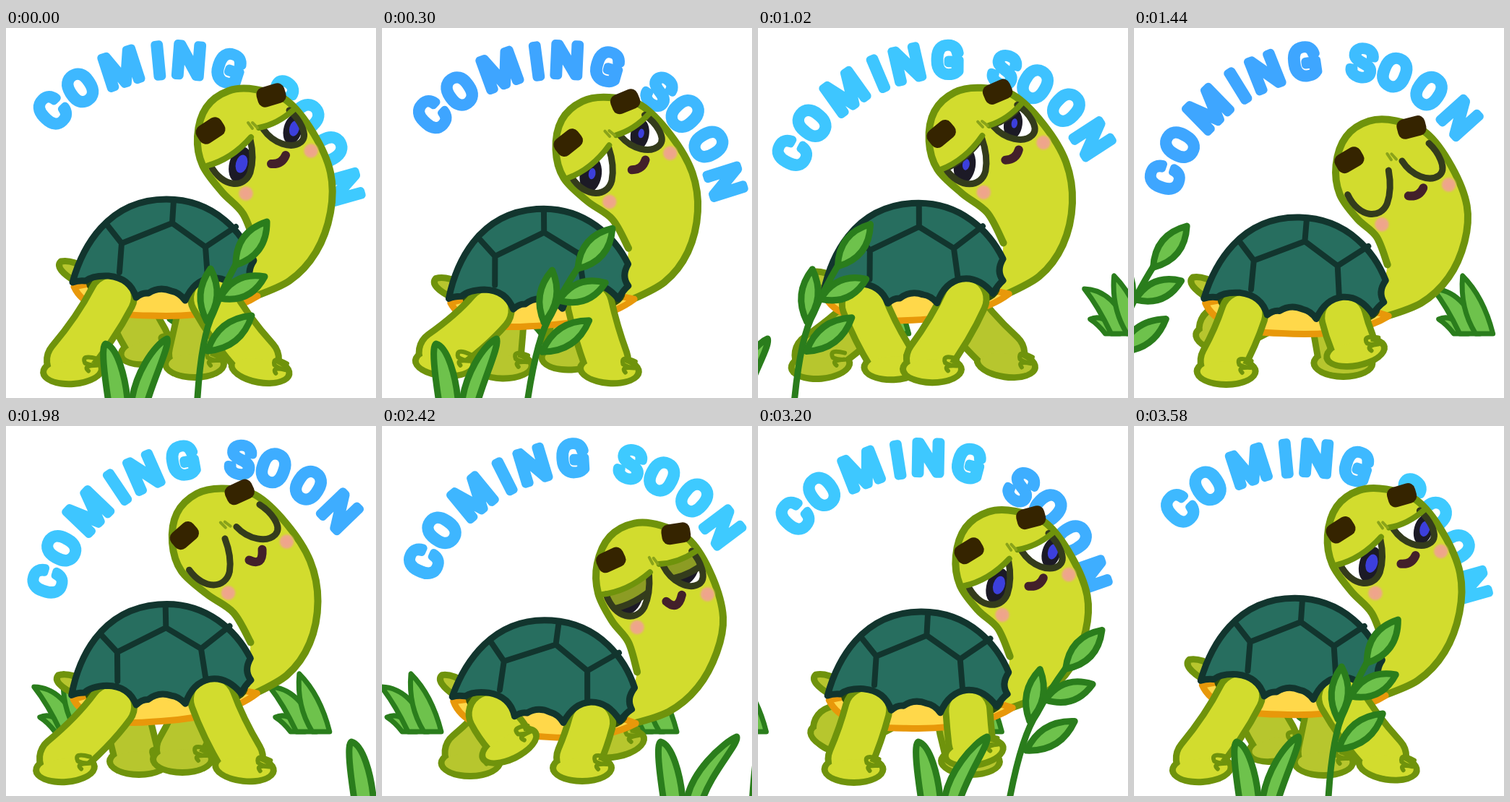
An HTML page with a canvas for the animation above (3600 ms loop, 512 by 512 pixels).

```html
<!DOCTYPE html>
<html lang="en">
<head>
<meta charset="utf-8">
<title>Coming soon</title>
<style>
  html, body { margin: 0; height: 100%; overflow: hidden; background: #fff; }
  canvas { display: block; width: 512px; height: 512px; }
</style>
</head>
<body>
<canvas id="stage" width="512" height="512" aria-label="COMING SOON"></canvas>
<script>
const ctx = document.getElementById('stage').getContext('2d');
const LOOP = 3600, STEP = 900, STRIDE = 1800, DEG = Math.PI / 180;
const SKIN = '#d2dc2e', SKIN_FAR = '#b7c62e', EDGE = '#6f930c';
const SHELL = '#276e5f', SHELL_EDGE = '#12352e', LID = '#343c1c';
const LEAF = '#6ec24c', LEAF_EDGE = '#2a7d1c';
const BODY = [217, 337], HEAD = [377, 200];

// Keys: [time, ...values]
const bodyKeys = [[0, 0, 0, 0], [180, -3, 10, -4.8], [500, 4, 20, -.5], [610, 6, 32, 4]];
const headKeys = [[0, 0, 0, 0], [180, -29, -4, -8], [500, 7, 34, 2], [545, 13, 46, 2.8], [610, 25, 57.5, 8.2]];
const backFoot = [[0, 92, 474, -4], [180, 82, 474, -4], [520, 112, 440, 15], [610, 174, 442, -25],
  [900, 195, 455, -10], [1080, 180, 473, 0], [1420, 130, 475, 0]];
const frontFoot = [[0, 352, 472, 10], [180, 330, 473, 6], [600, 279, 473, 0], [900, 257, 474, 0],
  [1080, 240, 470, 0], [1420, 303, 450, -10], [1500, 316, 447, -12]];
const openKeys = [[0, 1], [1000, 1], [1250, 0], [2200, 0], [2420, .45], [2800, 1]];
const gazeKeys = [[0, 1], [350, -1], [600, -1], [2420, .3], [3200, 1]];
const smileKeys = [[0, 0], [1500, 0], [1900, 1], [2500, 1], [2900, 0]];
const bladeKeys = [[0, 0], [600, 0], [2420, 20], [3200, 10]];

// Outline of neck and head: x, y, share of the head's motion
const neck = [[345, 300, 0], [328, 257, .3], [299, 227, .7], [272, 190, 1], [265, 150, 1], [277, 110, 1],
  [308, 87, 1], [345, 85, 1], [388, 100, 1], [425, 145, 1], [449, 200, .9], [449, 255, .6],
  [429, 310, .35], [392, 350, .15], [335, 375, 0]];
const eyes = [
  { lid: 'M277 191Q312 182 339 151', arc: 'M283 190C300 222 330 222 338 200Q344 180 338 154', x: 316, y: 189, dx: 8, s: 1 },
  { lid: 'M350 138Q376 133 398 113', arc: 'M356 140C370 160 395 168 408 158C420 148 405 125 392 114', x: 389, y: 140, dx: 8, s: .85 }
];
const letters = [['C', -59.5], ['O', -47.5], ['M', -32.5], ['I', -20], ['N', -10], ['G', 3.5],
  ['S', 22.5], ['O', 33.7], ['O', 46.5], ['N', 60]];

// Smooth periodic interpolation through keys
function pose(keys, period, t) {
  const n = keys.length;
  const at = i => {
    const [time, ...rest] = keys[(i + n) % n];
    return [time + Math.floor(i / n) * period, ...rest];
  };
  t = (t % period + period) % period;
  let i = n - 1;
  while (keys[i][0] > t) i--;
  const [a, b, c, d] = [i - 1, i, i + 1, i + 2].map(at);
  const h = c[0] - b[0], u = (t - b[0]) / h, v = 1 - u;
  return b.map((p, j) => {
    const m0 = (c[j] - a[j]) / (c[0] - a[0]) * h, m1 = (d[j] - b[j]) / (d[0] - b[0]) * h;
    return p * v * v * (1 + 2 * u) + m0 * u * v * v + c[j] * u * u * (3 - 2 * u) - m1 * u * u * v;
  }).slice(1);
}

const unit = (keys, t) => Math.max(0, Math.min(1, pose(keys, LOOP, t)[0]));
const wave = (t, period) => Math.cos(2 * Math.PI * t / period);

function place([px, py], [dx, dy, rot], x, y) {
  const c = Math.cos(rot * DEG), s = Math.sin(rot * DEG);
  x -= px; y -= py;
  return [px + dx + x * c - y * s, py + dy + x * s + y * c];
}

function within([px, py], [dx, dy, rot], draw) {
  ctx.save();
  ctx.translate(px + dx, py + dy);
  ctx.rotate(rot * DEG);
  ctx.translate(-px, -py);
  draw();
  ctx.restore();
}

function shape(path, fill, stroke, width) {
  if (typeof path === 'string') path = new Path2D(path);
  if (fill) { ctx.fillStyle = fill; ctx.fill(path); }
  if (stroke) { ctx.strokeStyle = stroke; ctx.lineWidth = width; ctx.stroke(path); }
}

function oval(x, y, rx, ry, rot, fill) {
  const p = new Path2D();
  p.ellipse(x, y, rx, ry, rot * DEG, 0, 7);
  shape(p, fill);
}

function smooth(points) {
  const p = new Path2D(), n = points.length;
  p.moveTo(...points[0]);
  for (let i = 0; i < n - 1; i++) {
    const a = points[Math.max(i - 1, 0)], b = points[i], c = points[i + 1], d = points[Math.min(i + 2, n - 1)];
    p.bezierCurveTo(b[0] + (c[0] - a[0]) / 6, b[1] + (c[1] - a[1]) / 6,
      c[0] - (d[0] - b[0]) / 6, c[1] - (d[1] - b[1]) / 6, c[0], c[1]);
  }
  return p;
}

function drawText(t) {
  const turn = wave(t, LOOP);
  const cx = 259 - 25 * turn + 9 * Math.sin(4 * Math.PI * t / LOOP);
  ctx.font = '400 62px Roboto, sans-serif';
  ctx.textAlign = 'center';
  ctx.lineWidth = 11;
  letters.forEach(([char, angle], i) => {
    const mix = .5 + .5 * wave(t + (i < 6 ? 300 : 0), 1200);
    ctx.save();
    ctx.translate(cx, 285);
    ctx.rotate((angle + 14.5 * turn) * DEG);
    ctx.fillStyle = ctx.strokeStyle = `rgb(62,${Math.round(165 + 37 * mix)},255)`;
    ctx.fillText(char, 0, -219);
    ctx.strokeText(char, 0, -219);
    ctx.restore();
  });
}

function drawTuft(x) {
  ctx.save();
  ctx.translate(x, 0);
  for (const d of ['M-38 423Q-60 394-79 403Q-68 410-58 423Z', 'M-22 423Q-45 362-87 361Q-68 385-50 423Z',
    'M-4 423Q-17 372-46 343Q-50 388-28 423Z']) shape(d, LEAF, LEAF_EDGE, 7);
  ctx.restore();
}

function drawBlades(x, lean) {
  ctx.save();
  ctx.translate(x, 0);
  shape('M12 525C5 480 0 440 7 437C22 441 35 480 38 525Z', LEAF, LEAF_EDGE, 9);
  shape(`M42 525C45 480 ${75 + lean} 437 ${92 + lean} 430C${96 + lean} 440 75 480 62 525Z`, LEAF, LEAF_EDGE, 9);
  ctx.restore();
}

function leaf(x0, y0, x1, y1, w) {
  const l = Math.hypot(x1 - x0, y1 - y0), nx = (y0 - y1) / l * w, ny = (x1 - x0) / l * w;
  const mx = (x0 + x1) / 2, my = (y0 + y1) / 2;
  shape(`M${x0} ${y0}Q${mx + nx} ${my + ny} ${x1} ${y1}Q${mx - nx} ${my - ny} ${x0} ${y0}Z`, LEAF, LEAF_EDGE, 9);
}

function drawSprig(x, rot) {
  within([0, 0], [x, 512, rot], () => {
    shape('M-4 40Q0-80 20-118Q32-150 52-187', null, LEAF_EDGE, 9);
    leaf(51, -184, 94, -244, 27);
    leaf(11, -106, 16, -179, 23);
    leaf(29, -138, 91, -168, 25);
    leaf(12, -65, 73, -114, 26);
  });
}

function drawLeg(hip, foot, fill) {
  const [x, y, rot] = foot, ax = x - 5, ay = y - 14;
  const leg = new Path2D();
  leg.moveTo(...hip);
  leg.quadraticCurveTo((hip[0] + ax) / 2 + (hip[0] - ax) * .12, (hip[1] + ay) / 2, ax, ay);
  for (const [color, grow] of [[EDGE, 9], [fill, 0]]) {
    shape(leg, null, color, 52 + 2 * grow);
    oval(x, y, 36 + grow, 14 + grow, rot, color);
  }
  within([0, 0], foot, () => shape('M35-14Q13-22 18-9Q25-5 34-5Q14-6 22 2', null, EDGE, 6));
}

function drawNeck(body, head) {
  const points = neck.map(([x, y, w]) => {
    const a = place(BODY, body, x, y), b = place(HEAD, head, x, y);
    return [a[0] + (b[0] - a[0]) * w, a[1] + (b[1] - a[1]) * w];
  });
  shape(smooth(points), SKIN, EDGE, 10);
}

function drawBelly() {
  shape('M94 358Q112 398 200 398Q300 402 348 371Q220 330 94 358Z', '#ffd84a', '#e8980a', 9);
  oval(148, 360, 38, 20, 15, '#2d4d0c');
  oval(290, 362, 46, 22, 0, '#2d4d0c');
}

function drawShell() {
  shape('M92 352C105 305 140 237 222 237C290 237 328 285 343 322Q332 338 341 352Q333 358 326 369' +
    'Q308 344 284 346Q260 349 248 377Q240 366 229 364Q212 357 197 367Q188 366 180 373Q172 346 142 343Q120 342 110 350Q100 349 92 352Z',
    SHELL, SHELL_EDGE, 9);
  shape('M232 238L230 270L160 298L138 270M160 298L157 338M230 270L276 303L318 275M276 303L279 345', null, SHELL_EDGE, 8);
}

function drawEye({ lid, arc, x, y, dx, s }, open, gaze) {
  if (open > .02) {
    const ix = x + dx * gaze, r = (6.2 + 1.8 * gaze) * s;
    ctx.save();
    ctx.clip(new Path2D(arc + 'Z'));
    ctx.fillStyle = '#fff';
    ctx.fillRect(260, 90, 180, 140);
    oval(ix, y, 15 * s, 25 * s, 15, '#1c1a26');
    oval(ix + 2, y - 1, r, r * 1.6, 15, '#3c3fdc');
    const drop = (1 - open) * 42;
    if (drop > 1) {
      ctx.translate(drop * .35, drop * .9);
      shape(lid + 'L400 60L250 130Z', '#8c9c24', LID, 9);
    }
    ctx.restore();
  }
  shape(arc, null, LID, 9);
  ctx.globalAlpha = Math.min(1, open * 3);
  shape(lid, null, EDGE, 8);
  ctx.globalAlpha = 1;
}

function drawFace(t) {
  const open = unit(openKeys, t), gaze = pose(gazeKeys, LOOP, t)[0], smile = unit(smileKeys, t);
  for (const eye of eyes) drawEye(eye, open, gaze);
  for (const [x, y] of [[332, 229], [422, 170]]) {
    const blush = ctx.createRadialGradient(x, y, 3, x, y, 12);
    blush.addColorStop(0, '#efa48c');
    blush.addColorStop(.55, '#ecaa84');
    blush.addColorStop(1, '#e4bc6000');
    oval(x, y, 12, 12, 0, blush);
  }
  shape('M335 131L341 139M341 131L348 138', null, '#8aa31a', 4);
  shape(`M367 188Q${382 + 3 * smile} ${189 + 11 * smile} 387 176`, null, '#43202a', 12);
  for (const [x, y, rot] of [[283, 142, -33], [367, 93, -17]]) {
    within([0, 0], [x, y, rot], () => {
      const brow = new Path2D();
      brow.roundRect(-20, -14, 40, 28, 10);
      shape(brow, '#352400');
    });
  }
}

function drawTurtle(t) {
  const body = pose(bodyKeys, STEP, t), head = pose(headKeys, STEP, t);
  const leg = (hx, hy, keys, far) => {
    const [x, y, rot] = pose(keys, STRIDE, t + (far ? STEP : 0));
    drawLeg(place(BODY, body, hx, hy), [x + (far ? 4 : 0), y - (far ? 9 : 0), rot], far ? SKIN_FAR : SKIN);
  };
  within(BODY, body, () => shape('M98 352Q66 333 76 323Q90 320 110 332Z', SKIN_FAR, EDGE, 9));
  leg(165, 372, backFoot, true);
  leg(272, 372, frontFoot, true);
  drawNeck(body, head);
  within(BODY, body, drawBelly);
  leg(147, 372, backFoot, false);
  leg(286, 374, frontFoot, false);
  within(BODY, body, drawShell);
  within(HEAD, head, () => drawFace(t));
}

function draw(t) {
  ctx.fillStyle = '#fff';
  ctx.fillRect(0, 0, 512, 512);
  ctx.lineJoin = ctx.lineCap = 'round';
  drawText(t);
  for (const lap of [0, 1]) drawTuft(305 - .0905 * t + 326 * lap);
  drawTurtle(t);
  const sway = 5 - 5 * wave(t, 1200), lean = pose(bladeKeys, LOOP, t)[0];
  for (const lap of [0, 1]) {
    const x = 756 * lap - .21 * t;
    drawBlades(131 + x, lean);
    drawSprig(267 + x, sway);
  }
}

const start = performance.now();
function tick() {
  const t = (performance.now() - start) % LOOP;
  draw(Math.floor(t / 20) * 20);
  requestAnimationFrame(tick);
}
tick();
</script>
</body>
</html>
```
